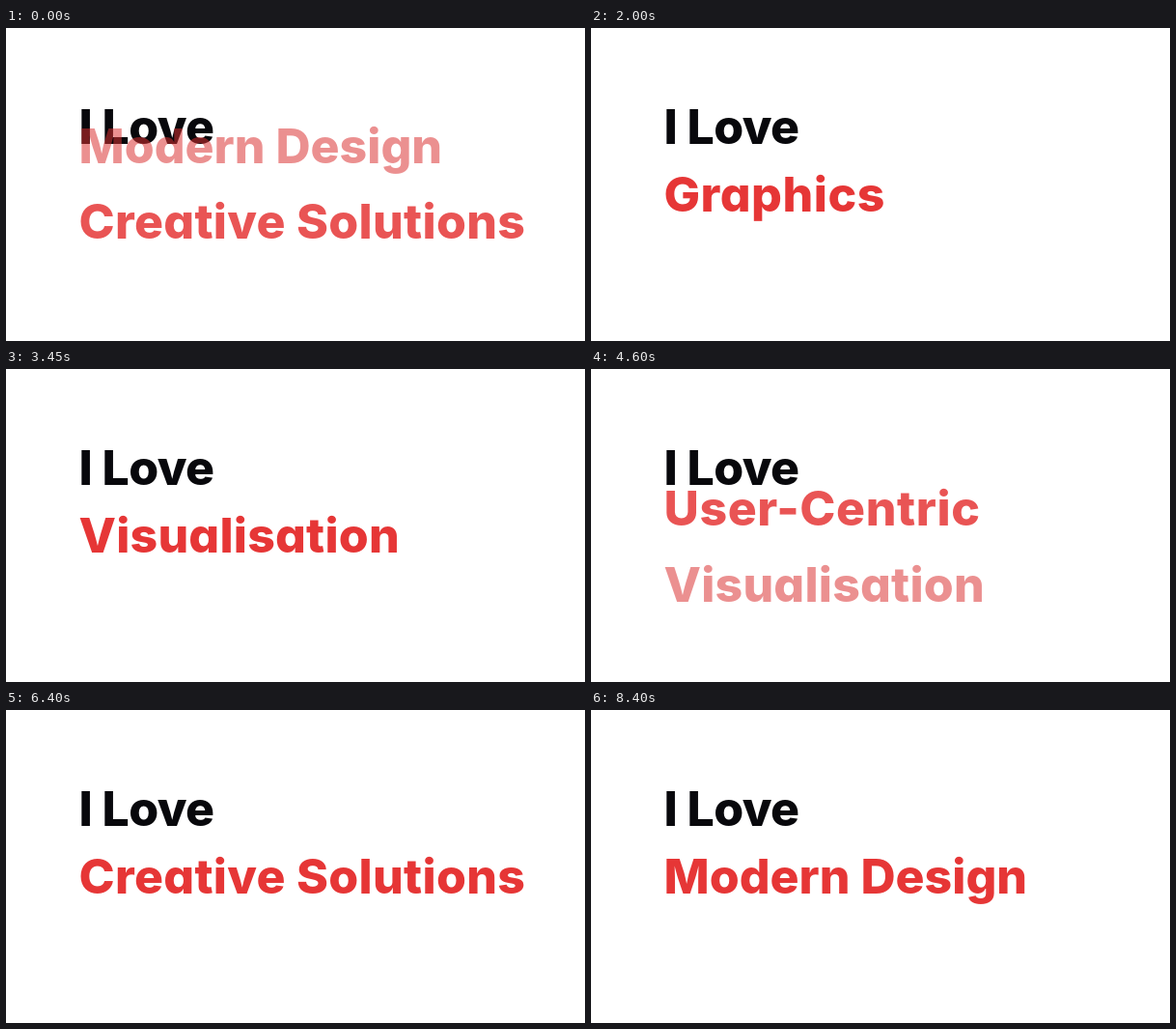
Recreate the animation shown at these times as an HTML page. Size 600 px wide and 324 px high, loop 8.5 s.

```html
<!DOCTYPE html>
<html lang="en">
<head>
<meta charset="utf-8">
<title>I Love</title>
<style>
  html, body {
    margin: 0;
    width: 100%;
    height: 100%;
    overflow: hidden;
    background: #fff;
  }
  svg { display: block; width: 600px; height: 324px; }
  text {
    font: 800 50px Inter, "Open Sans", sans-serif;
    font-optical-sizing: none;
    font-feature-settings: "cv11" 1, "kern" 1;
    white-space: pre;
  }
  .lead { letter-spacing: -0.6px; }
</style>
</head>
<body>
<svg viewBox="0 0 600 324">
  <text class="lead" x="75.5" y="119.7" fill="#08080c">I Love</text>
  <g id="words"></g>
</svg>
<script>
  const LOOP = 8500, TICK = 50;
  const PERIOD = 1500, LEAD = 150, SLIDE = 400;
  const LEFT = 75.5, BASE = 190.2, TRAVEL = 78.5;
  const FAINT = [122, 0, 8], FULL = [230, 54, 54];

  // text, tracking in px
  const words = [
    ["Modern Design", 0],
    ["Graphics", 0.5],
    ["Visualisation", 0.2],
    ["User-Centric", 0.6],
    ["Creative Solutions", 0.3]
  ].map(([label, tracking]) => {
    const el = document.createElementNS("http://www.w3.org/2000/svg", "text");
    el.textContent = label;
    el.setAttribute("x", LEFT);
    el.setAttribute("y", BASE);
    el.style.letterSpacing = tracking + "px";
    document.getElementById("words").append(el);
    return el;
  });

  // nearly linear, with a slight ease at both ends
  const ease = x => 0.75 * x + 0.25 * (1 - Math.cos(Math.PI * x)) / 2;

  function place(el, offset, shown) {
    const alpha = Math.sin(shown * Math.PI / 2);
    const mix = Math.min(1, shown / 0.4);
    const rgb = FAINT.map((c, i) => Math.round(c + (FULL[i] - c) * mix));
    el.setAttribute("transform", `translate(0 ${offset.toFixed(2)})`);
    el.setAttribute("fill", `rgb(${rgb})`);
    el.setAttribute("opacity", alpha.toFixed(3));
  }

  function draw(ms) {
    const t = Math.floor(ms % LOOP / TICK) * TICK + LEAD;
    const turn = Math.floor(t / PERIOD);
    const p = ease(Math.min(1, t % PERIOD / SLIDE));
    const count = words.length;
    const next = turn % count;
    const last = (turn + count - 1) % count;
    words.forEach((el, i) => {
      if (i === next) place(el, (p - 1) * TRAVEL, p);
      else if (i === last) place(el, p * TRAVEL, 1 - p);
      else el.setAttribute("opacity", 0);
    });
  }

  const start = performance.now();
  function frame() {
    draw(performance.now() - start);
    requestAnimationFrame(frame);
  }
  frame();
</script>
</body>
</html>
```
